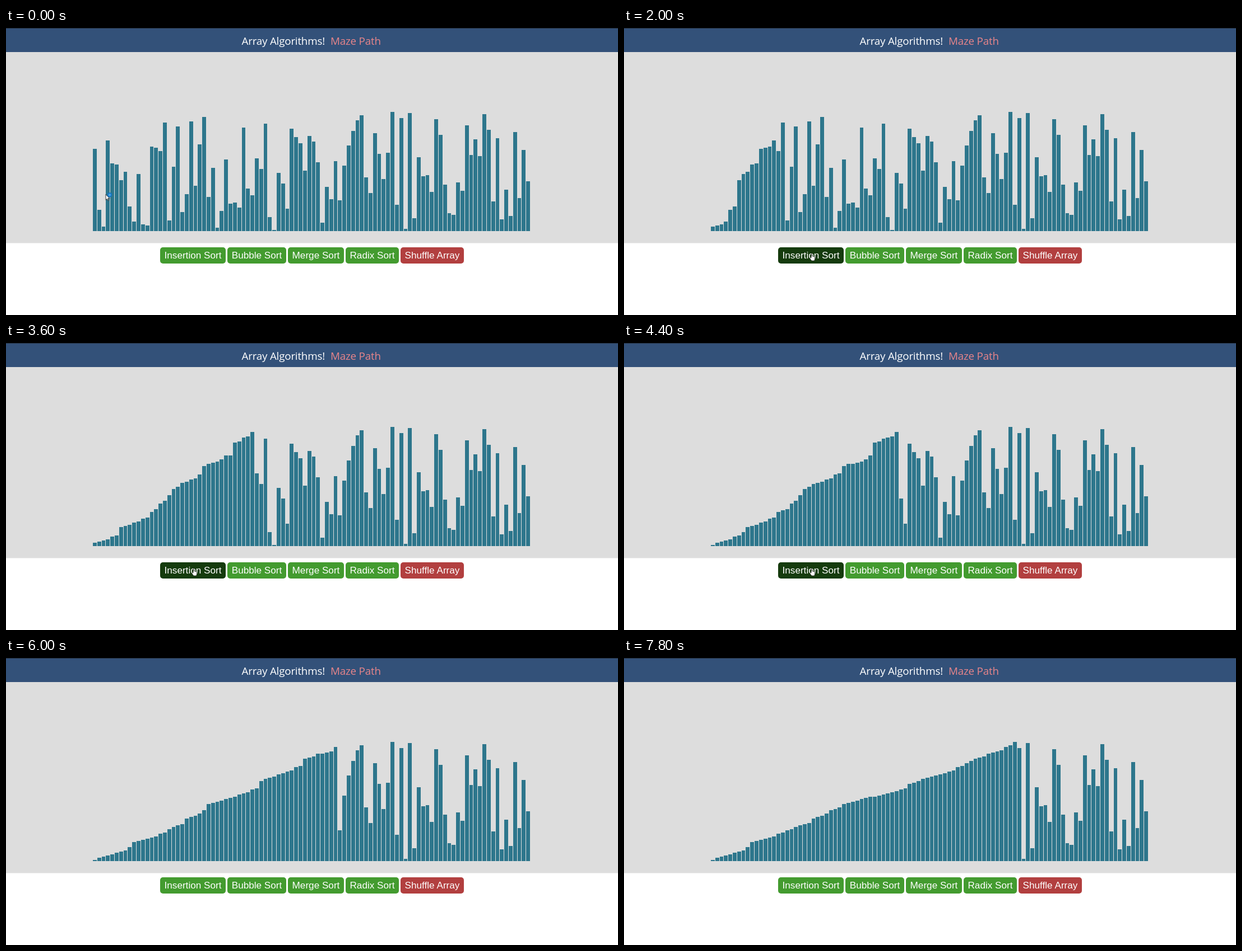
An HTML page that plays this animation: 1092x513 px, repeating every 8 s.

```html
<!DOCTYPE html>
<html lang="en">
<head>
<meta charset="utf-8">
<title>Array Algorithms</title>
<style>
  html, body { margin: 0; width: 100%; height: 100%; overflow: hidden; background: #fff; }
  svg { display: block; }
  .title { font: 18.8px "Open Sans", "Noto Sans", sans-serif; letter-spacing: -.2px; }
  .button text { font: 17.15px "Liberation Sans", Arial, sans-serif; fill: #fff; text-anchor: middle; }
  .button { fill: #439b2f; }
  .button.hover { fill: #153b0d; }
  .button.shuffle { fill: #b23f3f; }
  #bars { fill: #2d768c; shape-rendering: crispEdges; }
</style>
</head>
<body>
<svg id="stage" width="1092" height="513">
  <rect width="1092" height="43" fill="#335179"/>
  <rect width="1092" height="1" fill="#25303f"/>
  <rect y="43" width="1092" height="341.5" fill="#ddd"/>
  <text class="title" x="420.5" y="30" fill="#fff">Array Algorithms!</text>
  <text class="title" x="579" y="30" fill="#e9858a">Maze Path</text>
  <g id="bars"></g>
  <g id="buttons"></g>
  <g id="arrow">
    <path d="M.5 .5V10.5L2.9 8.3L4.4 11.7L6 11L4.5 7.7H7.6Z" fill="#fff" stroke="#111" stroke-width=".8"/>
    <circle id="busy" cx="7.5" cy="1.3" r="3.2" fill="#4aa3dc" stroke="#1473c4" stroke-width="1.8"/>
  </g>
  <path id="hand" d="M3 8V1.2Q3 .4 3.8 .4T4.6 1.2V5Q6 4.5 6.4 5.4Q7.6 5 8 6Q9.4 5.8 9.5 7V10Q9.3 11.6 8.5 13H3.8L.8 9Q.3 7.7 1.4 7.5Z"
    fill="#fff" stroke="#222" stroke-width=".7"/>
</svg>
<script>
const LOOP = 8000, TICK = 200;
const BAR = { left: 155, pitch: 7.81, base: 363.4, unit: 2.133 };
const VALUES = [
  69, 18, 4, 76, 57, 56, 43, 50, 21, 8, 48, 6, 5, 71, 70, 67, 91, 9, 54, 88,
  16, 31, 92, 38, 73, 96, 29, 53, 3, 17, 60, 23, 24, 20, 87, 36, 30, 61, 52, 90,
  12, 1, 49, 40, 19, 86, 79, 74, 51, 80, 75, 58, 7, 37, 27, 59, 26, 55, 72, 84,
  93, 97, 45, 32, 82, 65, 44, 66, 100, 22, 95, 2, 99, 11, 62, 46, 47, 33, 94, 81,
  39, 15, 14, 41, 34, 89, 64, 77, 63, 98, 85, 25, 78, 10, 35, 13, 83, 28, 68, 42
];
const BUTTONS = [
  ["Insertion Sort", 275, 117], ["Bubble Sort", 395, 105], ["Merge Sort", 503, 100],
  ["Radix Sort", 606, 95], ["Shuffle Array", 704, 113, "shuffle"]
];
// Progress of the sort: time, element being inserted, shifts made for it.
const PACE = [
  [1590, 1, 0], [2000, 15, 0], [2800, 28, 24], [4400, 42, 11],
  [5400, 52, 16], [6800, 63, 1], [7800, 69, 33]
];
// Pointer: time, x, y, kind.
const POINTER = [
  [0, 177.5, 297, "busy"], [200, 194, 308, "busy"], [400, 252, 348, "arrow"],
  [600, 318, 395, "hand"], [800, 331, 403, "hand"],
  [4800, 151, 482, "arrow"], [5000, 0, 0, "none"]
];

const byId = id => document.getElementById(id);
function add(parent, tag, attrs) {
  const node = document.createElementNS("http://www.w3.org/2000/svg", tag);
  for (const key in attrs) node.setAttribute(key, attrs[key]);
  return parent.appendChild(node);
}

const barLeft = i => Math.round(BAR.left + i * BAR.pitch);
const bars = VALUES.map((_, i) => add(byId("bars"), "rect", {
  x: barLeft(i), width: barLeft(i + 1) - barLeft(i) - 1
}));

const buttons = BUTTONS.map(([label, x, width, kind = ""]) => {
  const group = add(byId("buttons"), "g", { class: "button " + kind });
  add(group, "rect", { x, y: 392, width, height: 29, rx: 5 });
  add(group, "text", { x: x + width / 2, y: 411.7 }).textContent = label;
  return group;
});

const steps = [];
VALUES.forEach((value, i) => {
  if (!i) return;
  const larger = VALUES.slice(0, i).filter(v => v > value).length;
  for (let shifts = 0; shifts <= larger; shifts++) steps.push([i, shifts]);
});
const pace = PACE.map(([time, i, shifts]) =>
  [time, steps.findIndex(s => s[0] === i && s[1] === shifts)]);

function stepAt(time) {
  if (time <= pace[0][0]) return steps[0];
  const next = Math.max(1, pace.findIndex(p => p[0] >= time));
  const [t0, s0] = pace[next - 1], [t1, s1] = pace[next];
  return steps[Math.round(s0 + (s1 - s0) * (time - t0) / (t1 - t0))];
}

function arrayAt(time) {
  const [i, shifts] = stepAt(time);
  const array = VALUES.slice(0, i).sort((a, b) => a - b).concat(VALUES.slice(i));
  for (let j = i; j > i - shifts; j--) array[j] = array[j - 1];
  return array;
}

function show(node, visible, x, y) {
  node.setAttribute("visibility", visible ? "visible" : "hidden");
  if (x !== undefined) node.setAttribute("transform", `translate(${x} ${y})`);
}

function draw(time) {
  arrayAt(time).forEach((value, i) => {
    const top = Math.round(BAR.base - value * BAR.unit);
    bars[i].setAttribute("y", top);
    bars[i].setAttribute("height", Math.round(BAR.base) - top);
  });
  const [, x, y, kind] = POINTER.filter(p => p[0] <= time).pop();
  show(byId("arrow"), kind === "arrow" || kind === "busy", x, y);
  show(byId("busy"), kind === "busy");
  show(byId("hand"), kind === "hand", x, y);
  buttons[0].classList.toggle("hover", kind === "hand");
}

let shown = -1;
const start = performance.now();
function frame() {
  const elapsed = Math.max(0, performance.now() - start) % LOOP;
  const time = Math.floor(elapsed / TICK) * TICK;
  if (time !== shown) draw(shown = time);
  requestAnimationFrame(frame);
}
frame();
</script>
</body>
</html>
```
